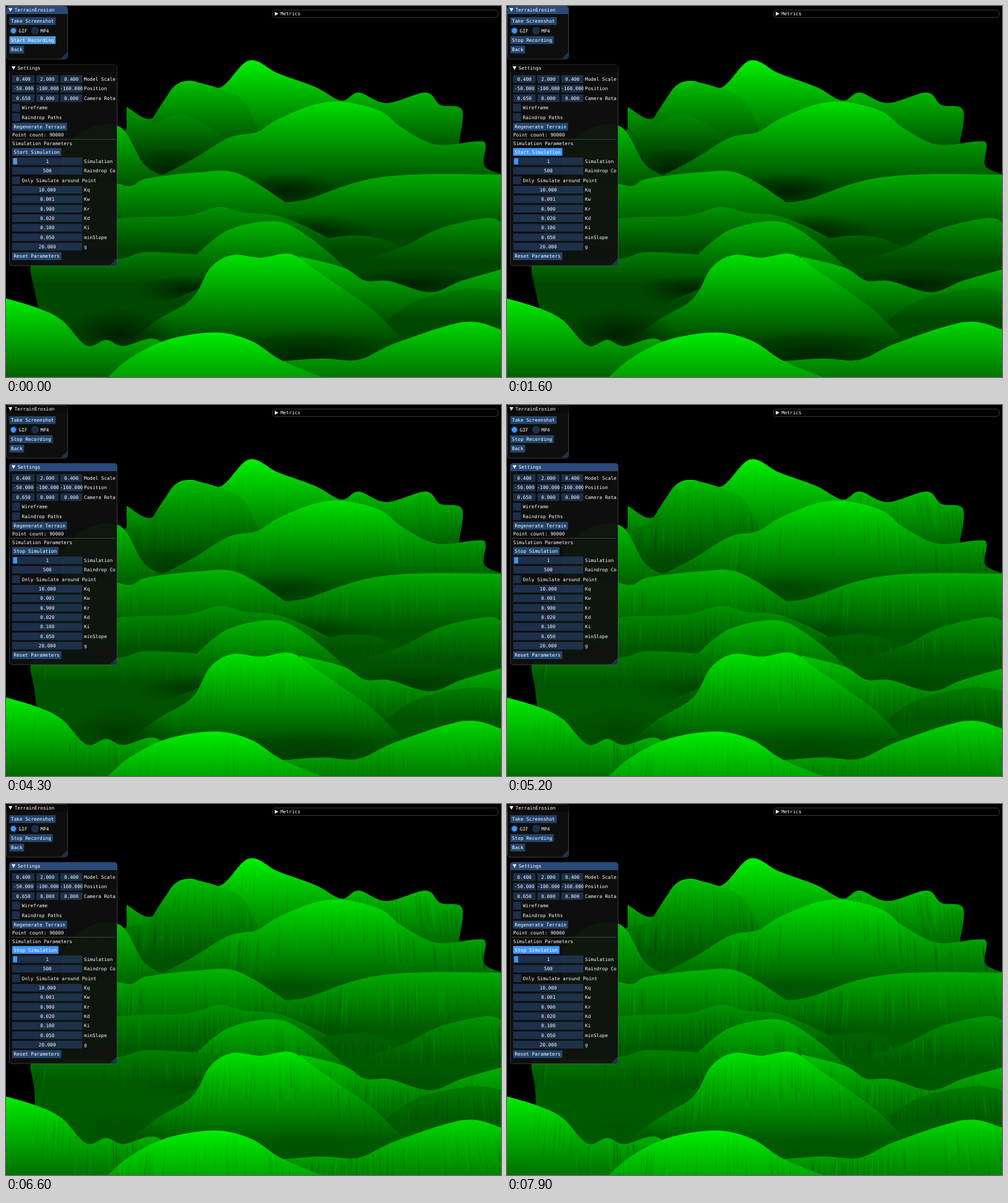
These frames come from a looping animation (800 px wide and 600 px high, 8000 ms). An HTML page with a canvas:

```html
<!DOCTYPE html>
<html lang="en">
<head>
<meta charset="utf-8">
<title>TerrainErosion</title>
<style>
  html, body { margin: 0; width: 800px; height: 600px; overflow: hidden; background: #000; }
  canvas, #ui { position: absolute; left: 0; top: 0; display: block; }
  text { font: 7.7px "DejaVu Sans Mono", monospace; fill: #fff; }
  .win { fill: #0f0f0f; fill-opacity: .94; stroke: #6e6e80; stroke-opacity: .5; }
  .win.shut { fill: #000; }
  .title { fill: #0a0a0a; }
  .title.on { fill: #294a7a; }
  .frame { fill: #294a7a; fill-opacity: .56; }
  .btn { fill: #23456d; }
  .btn.hover, .mark { fill: var(--hot); }
  .btn.press { fill: #0f87fa; }
  .tri { fill: #fff; }
  .grip { fill: #1c3350; }
  .rule { stroke: #3e3e47; }
</style>
</head>
<body>
<canvas id="land" width="800" height="600"></canvas>
<svg id="ui" width="800" height="600" viewBox="0 0 800 600"></svg>
<script>
const LOOP = 8000, STEP = 100, START = 3300;
const CHAR = 4.635, ROW = 15.35, BOX = 12.6;
const ctx = document.getElementById('land').getContext('2d');
const ui = document.getElementById('ui');
const $ = id => document.getElementById(id);
const mix = (a, b, k) => a + (b - a) * k;

// ---------- panels ----------
const buttonWidth = s => s.length * CHAR + 5.3;
const text = (x, y, s, anchor = 'start') =>
  `<text x="${x}" y="${y + 2.7}" text-anchor="${anchor}">${s}</text>`;
const button = (x, y, s, id = '') =>
  `<g id="${id}"><rect class="btn" x="${x}" y="${y - BOX / 2}" width="${buttonWidth(s)}" height="${BOX}"/>` +
  text(x + 2.6, y, s) + '</g>';
const field = (x, y, w, s) =>
  `<svg x="${x}" y="${y - BOX / 2}" width="${w}" height="${BOX}"><rect class="frame" width="${w}" height="${BOX}"/>` +
  (s.length > 7 ? text(0, BOX / 2, s) : text(w / 2, BOX / 2, s, 'middle')) + '</svg>';
const row = (y, s, label) => field(10, y, 113.5, s) + text(126, y, label);
const triple = (y, label, ...values) =>
  values.map((s, i) => field(10 + i * 38.7, y, 36.2, s)).join('') + text(126, y, label);
const check = (y, label) =>
  `<rect class="frame" x="10" y="${y - BOX / 2}" width="${BOX}" height="${BOX}"/>` + text(25.5, y, label);
const radio = (x, label, on) =>
  `<circle class="frame" cx="${x}" cy="40" r="6.2"/>` +
  (on ? `<circle class="mark" cx="${x}" cy="40" r="4.2"/>` : '') + text(x + 8.6, 40, label);
const panel = (x, y, w, h, name, id) =>
  `<rect class="win" x="${x + .5}" y="${y + .5}" width="${w - 1}" height="${h - 1}" rx="4.5"/>
   <path id="${id}" class="title" d="M${x + .5} ${y + 13}v-8.5q0-4 4-4h${w - 9}q4 0 4 4v8.5z"/>
   <path class="tri" d="M${x + 4} ${y + 3.6}h6.4l-3.2 5.6z"/>
   <path class="grip" d="M${x + w - 1} ${y + h - 12}v8q0 3-3 3h-8z"/>` + text(x + 13.7, y + 6.5, name);

const params = { Kq: '10.000', Kw: '0.001', Kr: '0.900', Kd: '0.020', Ki: '0.100', minSlope: '0.050', g: '20.000' };

ui.innerHTML =
  panel(0, 0, 100, 86.5, 'TerrainErosion', 'bar1') +
  button(5.4, 24.4, 'Take Screenshot') +
  radio(12, 'GIF', true) + radio(47, 'MP4') +
  button(5.4, 55.2, 'Start Recording', 'rec') +
  button(5.4, 70.5, 'Back') +
  panel(5, 94, 175, 326.5, 'Settings', 'bar2') +
  '<svg width="177" height="600">' +
  triple(118.3, 'Model Scale', '0.400', '2.000', '0.400') +
  triple(133.6, 'Position', '-50.000', '-100.000', '-160.000') +
  triple(149, 'Camera Rotation', '0.650', '0.000', '0.000') +
  check(164.4, 'Wireframe') +
  check(179.8, 'Raindrop Paths') +
  button(10, 195.2, 'Regenerate Terrain') +
  text(10, 208.6, 'Point count: 90000') +
  '<path class="rule" d="M8 215.5H178"/>' +
  text(10, 222.4, 'Simulation Parameters') +
  button(10, 236, 'Start Simulation', 'sim') +
  row(251.2, '1', 'Simulation Speed') +
  '<rect class="mark" x="11.5" y="246.2" width="6.5" height="10"/>' +
  row(266.5, '500', 'Raindrop Count') +
  check(281.8, 'Only Simulate around Point') +
  Object.entries(params).map(([name, v], i) => row(297.2 + i * ROW, v, name)).join('') +
  button(10, 404.6, 'Reset Parameters') + '</svg>' +
  '<rect class="win shut" x="430.5" y="6.5" width="365" height="12" rx="4.5"/>' +
  '<path class="tri" d="M434.5 9.2v6.6l5.6-3.3z"/>' + text(443.4, 12.6, 'Metrics');

function setButton(id, label, state) {
  const [box, words] = $(id).children;
  box.setAttribute('width', buttonWidth(label));
  box.setAttribute('class', 'btn ' + state);
  words.textContent = label;
}

function drawPanels(t) {
  const over = t >= 1600 && t < 4200 || t >= 6500;
  const held = t >= 2800 && t < START;
  ui.style.setProperty('--hot', t < STEP ? '#5597d8' : '#4296fa');
  setButton('rec', t < STEP ? 'Start Recording' : 'Stop Recording', t < 500 ? 'hover' : '');
  setButton('sim', t <= START ? 'Start Simulation' : 'Stop Simulation', held ? 'press' : over ? 'hover' : '');
  $('bar1').classList.toggle('on', t < 2800);
  $('bar2').classList.toggle('on', t >= 2800);
}

// ---------- terrain ----------
const FOOT = 72, WORN_FOOT = 92, RISE = 1.1;
let seed, wear;
function rnd() {
  seed = (seed * 16807) % 2147483647;
  return seed / 2147483647;
}

function vertical(y0, y1, ...colors) {
  const g = ctx.createLinearGradient(0, y0, 0, y1);
  colors.forEach((c, i) => g.addColorStop(i / (colors.length - 1), c));
  return g;
}

// Smooth ridge through the key points; green grows with the height above the ground line.
function hill(ground, ...keys) {
  const pts = [];
  for (let i = 0; i < keys.length; i += 2) pts.push({ x: keys[i], y: keys[i + 1] });
  const last = pts.length - 1, end = pts[last];
  const at = i => pts[Math.max(0, Math.min(last, i))];
  const top = Math.min(...pts.map(p => p.y));

  ctx.save();
  ctx.beginPath();
  ctx.moveTo(pts[0].x, 601);
  ctx.lineTo(pts[0].x, pts[0].y);
  for (let i = 0; i < last; i++) {
    const a = at(i - 1), b = at(i), c = at(i + 1), d = at(i + 2);
    ctx.bezierCurveTo(b.x + (c.x - a.x) / 6, b.y + (c.y - a.y) / 6,
      c.x - (d.x - b.x) / 6, c.y - (d.y - b.y) / 6, c.x, c.y);
  }
  ctx.lineTo(end.x, 601);
  ctx.fillStyle = vertical(top, ground,
    `rgb(0,${FOOT + RISE * (ground - top)},0)`, `rgb(0,${mix(FOOT, WORN_FOOT, wear)},0)`);
  ctx.fill();
  if (wear > 0) {
    ctx.clip();
    rills(pts, top, ground);
  }
  ctx.restore();
}

// Faint gullies that run down from the ridge and spread outwards.
function rills(pts, top, ground) {
  const x0 = pts[0].x, span = pts[pts.length - 1].x - x0;
  const tones = ['0,25,0', '0,210,0'].map(c =>
    vertical(top, ground + 20, `rgba(${c},0)`, `rgba(${c},${.13 * wear})`, `rgba(${c},0)`));
  for (let k = 0; k < span / 7; k++) {
    const f = rnd() * (pts.length - 1), i = Math.floor(f);
    const x = mix(pts[i].x, pts[i + 1].x, f - i), y = mix(pts[i].y, pts[i + 1].y, f - i) + rnd() * 15;
    const len = 30 + rnd() * 60, lean = len * .3 * ((x - x0) / span - .5);
    ctx.strokeStyle = tones[k % 3 ? 0 : 1];
    ctx.lineWidth = 1 + rnd() * 2.5;
    ctx.beginPath();
    ctx.moveTo(x, y);
    ctx.quadraticCurveTo(x + lean * .2, y + len / 2, x + lean, y + len);
    ctx.stroke();
  }
}

// Soft dark valley that fills up as the land wears down.
function hollow(x, y, rx, ry) {
  ctx.save();
  ctx.translate(x, y);
  ctx.scale(rx, ry);
  const g = ctx.createRadialGradient(0, 0, 0, 0, 0, 1);
  g.addColorStop(0, `rgba(0,12,0,${.65 * (1 - .85 * wear)})`);
  g.addColorStop(1, 'rgba(0,12,0,0)');
  ctx.fillStyle = g;
  ctx.fillRect(-1, -1, 2, 2);
  ctx.restore();
}

function drawLand(w) {
  wear = w;
  seed = 4711;
  ctx.fillStyle = '#000';
  ctx.fillRect(0, 0, 800, 600);

  // far range
  hill(240, 195,163, 236,182, 270,132, 300,121, 346,132, 393,88, 440,109, 500,131, 542,153, 570,140,
    615,157, 678,140, 702,160, 737,168, 732,222);
  hill(230, 236,183, 270,134, 300,123, 346,134, 385,155, 412,210);
  hill(238, 192,200, 240,190, 290,176, 365,218);
  hollow(268, 265, 85, 35);
  hill(291, 245,277, 300,249, 360,213, 405,204, 440,183, 497,160, 545,155, 605,170, 640,197, 695,224,
    760,219, 775,224, 773,258, 800,272);
  hollow(455, 300, 85, 32);

  // middle distance
  hill(300, 90,235, 130,200, 185,196, 225,258, 270,280);
  hill(363, 440,318, 485,313, 550,290, 605,277, 685,272, 800,273);
  hill(365, 75,305, 150,283, 200,291, 228,279, 312,269, 375,271, 455,320, 490,350);
  hollow(490, 370, 110, 35);
  hill(394, 60,355, 200,342, 290,339, 345,325, 385,334, 445,341, 520,375, 540,400);
  hill(395, 480,385, 545,372, 600,375, 660,400);
  hill(412, 560,415, 640,390, 700,360, 775,343, 800,349);
  hill(448, 310,400, 360,362, 432,348, 480,367, 545,420, 560,450);
  hollow(660, 450, 140, 28);

  // near slopes
  hill(449, mix(53, 47, w),490, 45,455, 40,420, 60,412, 180,409, 230,398, 350,405);
  hollow(300, 460, 90, 25);
  hill(475, 150,545, 213,503, 260,479, 330,450);
  hill(518, 475,405, 545,423, 580,444, 620,445, 685,463, 735,445, 800,426);
  hill(505, 590,530, 660,478, 750,457, 800,462);
  hill(541, 180,560, 240,511, 300,474, 330,424, 365,403, 412,407, 460,401, 502,428, 560,468, 600,498, 660,560);
  hollow(182, 530, 95, 42);
  hollow(490, 568, 150, 45);

  // foreground
  hill(641, 440,575, 510,570, 570,572, 630,545, 740,511, 800,523);
  hill(622, 0,473, 50,488, 90,508, 130,549, 162,540, 190,550, 246,540, 290,600);
  hill(679, 165,600, 200,570, 260,540, 337,528, 395,541, 445,573, 510,600);
}

// ---------- clock ----------
const erosion = t => t < START ? 0 : Math.min(1, (1 - Math.exp((START - STEP - t) * .0006)) / .94);
let shown = -1;
function tick() {
  const t = Math.floor(performance.now() % LOOP / STEP) * STEP;
  if (t !== shown) {
    if (erosion(t) !== wear) drawLand(erosion(t));
    drawPanels(t);
    shown = t;
  }
  requestAnimationFrame(tick);
}
tick();
</script>
</body>
</html>
```
